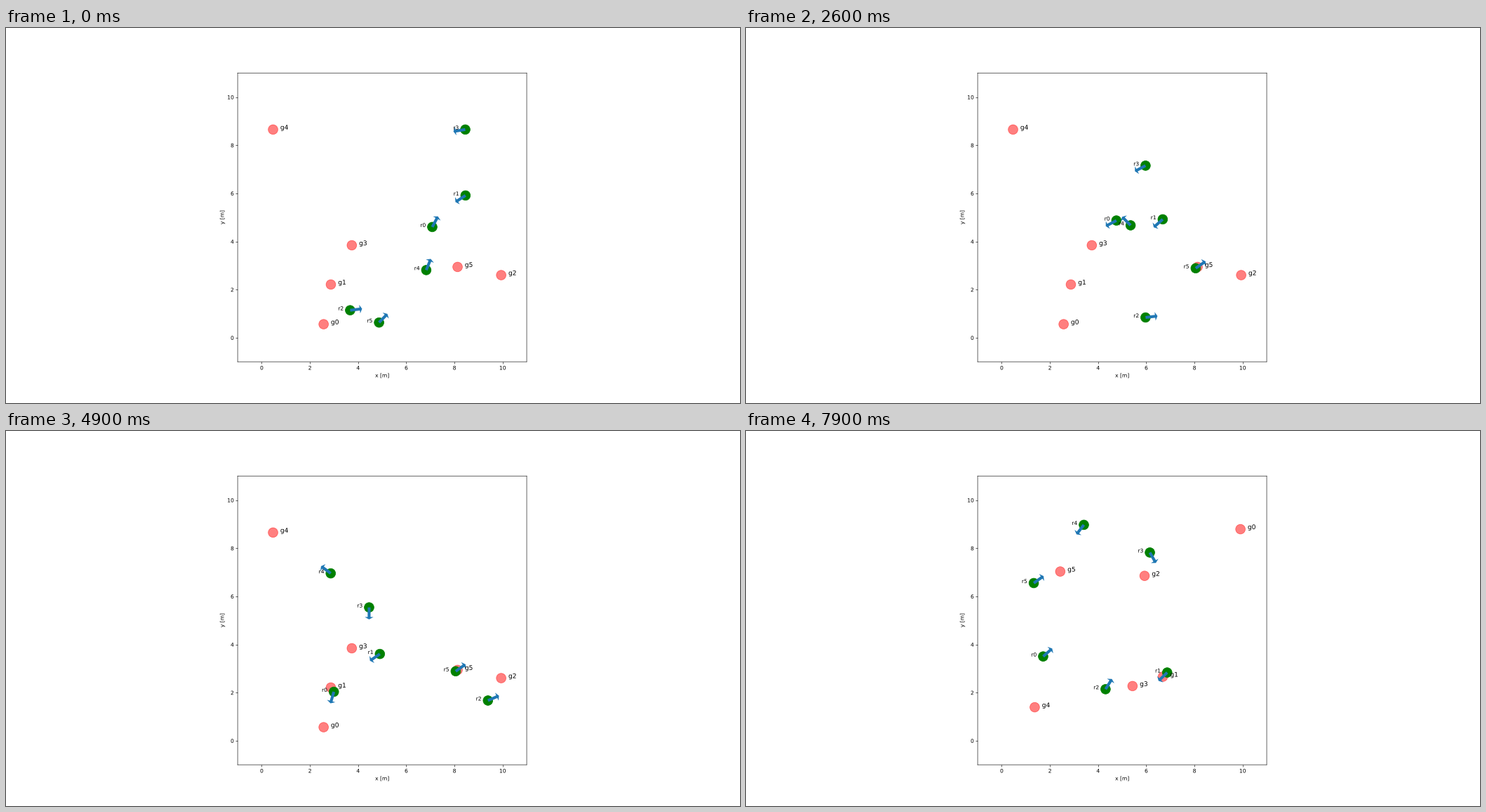
Recreate the animation shown at these times as a matplotlib script. Size 1046 px wide and 535 px high, loop 8000 ms.

```python
import numpy as np
import matplotlib.pyplot as plt
from matplotlib.animation import FuncAnimation
from matplotlib.patches import Circle, Polygon
from matplotlib.patheffects import Normal

W, H, DPI = 1046, 535, 100
K = 0.545            # scale of fonts and lines
STEP = 0.15          # top speed, metres per frame
REACH = 0.245        # a robot this close to its goal has arrived
SETTLE = 3           # frames to turn into the direction of travel
RADIUS = 0.2
FRAMES, RESET = 80, 70

# Unsnapped lines and outlined text keep sub-pixel positions.
plt.rcParams.update({
    "font.family": "DejaVu Sans", "font.size": 10 * K, "text.hinting": "none",
    "path.snap": False, "path.effects": [Normal()],
    "axes.linewidth": 0.8 * K, "axes.labelpad": 4 * K,
})
for axis in ("xtick", "ytick"):
    plt.rcParams.update({f"{axis}.major.size": 3.5 * K,
                         f"{axis}.major.width": 0.8 * K,
                         f"{axis}.major.pad": 3.5 * K})

# Robot: start (x, y, heading), goal, and the bends (frame, x, y) between them
ROUND_A = [
    ((7.08, 4.60, 62), (2.57, 0.56), [(8, 7.04, 4.63), (26, 4.76, 4.87), (41, 3.42, 3.14)]),
    ((8.46, 5.91, 213), (2.87, 2.21), [(8, 7.65, 5.54), (41, 5.80, 4.22)]),
    ((3.67, 1.14, 7), (9.94, 2.60), [(26, 5.97, 0.84), (41, 8.16, 1.30),
                                     (53, 9.86, 1.99), (57, 10.14, 2.46)]),
    ((8.45, 8.65, 189), (3.74, 3.84), [(26, 5.97, 7.15), (41, 4.60, 6.49), (57, 4.23, 4.45)]),
    ((6.83, 2.81, 68), (0.47, 8.65), [(8, 6.51, 3.48), (26, 5.35, 4.67), (41, 3.79, 6.21)]),
    ((4.87, 0.63, 46), (8.13, 2.94), []),
]
ROUND_B = [
    ((1.14, 2.95, 45), (9.91, 8.79), [(9, 1.72, 3.50)]),
    ((7.84, 3.77, 225), (6.69, 2.66), []),
    ((3.56, 1.06, 45), (5.93, 6.85), [(9, 4.31, 2.14)]),
    ((5.33, 8.89, -45), (5.43, 2.27), [(9, 6.15, 7.82)]),
    ((4.18, 9.83, 225), (1.37, 1.39), [(9, 3.41, 8.97)]),
    ((0.47, 5.53, 45), (2.43, 7.03), [(9, 1.33, 6.55)]),
]

ARROW = np.array([(0, 0.1), (0, -0.1), (0.8, -0.1), (0.8, -0.3),
                  (1, 0), (0.8, 0.3), (0.8, 0.1)]) * (0.5, 0.6)


class Path:
    """Smooth run through the bends, then straight to the goal at top speed."""

    def __init__(self, start, goal, bends):
        nodes = [(0, *start[:2]), *bends]
        t, x, y = nodes[-1]
        gap = np.array(goal) - (x, y)
        dist = np.hypot(*gap)
        steps = np.ceil((dist - REACH) / STEP)
        if steps > 0:
            nodes.append((t + steps, *((x, y) + gap / dist * STEP * steps)))
        nodes = np.array(nodes, float)
        self.goal, self.first = goal, np.radians(start[2])
        self.times, self.points = nodes[:, 0], nodes[:, 1:]
        self.speeds = np.gradient(self.points, self.times, axis=0)

    def pose(self, t):
        end = min(t, self.times[-1])
        i = np.searchsorted(self.times[1:-1], end, side="right")
        span = self.times[i + 1] - self.times[i]
        u = (end - self.times[i]) / span
        p, q = self.points[i:i + 2]
        a, b = self.speeds[i:i + 2] * span
        # Hermite curve and its slope
        pos = p + u * a + u**2 * (3 * (q - p) - 2 * a - b) + u**3 * (2 * (p - q) + a + b)
        slope = a + 2 * u * (3 * (q - p) - 2 * a - b) + 3 * u**2 * (2 * (p - q) + a + b)
        travel = np.arctan2(slope[1], slope[0])
        turn = (self.first - travel + np.pi) % (2 * np.pi) - np.pi
        return pos, travel + turn * np.exp(-t / SETTLE)


fig, ax = plt.subplots(figsize=(W / DPI, H / DPI), dpi=DPI)
fig.subplots_adjust(left=0.125, right=0.9, bottom=0.11, top=0.88)
ax.set_aspect("equal")
ax.set(xlim=(-1, 11), ylim=(-1, 11), xlabel="x [m]", ylabel="y [m]",
       xticks=range(0, 11, 2), yticks=range(0, 11, 2))


def disc(**style):
    return ax.add_patch(Circle((0, 0), RADIUS, lw=K, **style))


def label(text, size):
    return ax.text(0, 0, text, fontsize=size * K, color="black")


goals = [(disc(color="red", alpha=0.5), label(f"g{i}", 12)) for i in range(6)]
robots = [(disc(color="green"),
           ax.add_patch(Polygon(ARROW, fc="C0", ec="none")),
           label(f"r{i}", 10)) for i in range(6)]
rounds = [(0, [Path(*row) for row in ROUND_A]),
          (RESET, [Path(*row) for row in ROUND_B])]


def draw(frame):
    begin, paths = rounds[frame >= RESET]
    for path, (dot, tag), (body, arrow, name) in zip(paths, goals, robots):
        x, y = path.goal
        dot.center = x, y
        tag.set_position((x + 0.3, y))
        (x, y), angle = path.pose(frame - begin)
        body.center = x, y
        c, s = np.cos(angle), np.sin(angle)
        arrow.set_xy(ARROW @ np.array([(c, s), (-s, c)]) + (x, y))
        name.set_position((x - 0.5, y))
    return []


anim = FuncAnimation(fig, draw, frames=FRAMES, interval=100, repeat=True, repeat_delay=0)
plt.show()
```
